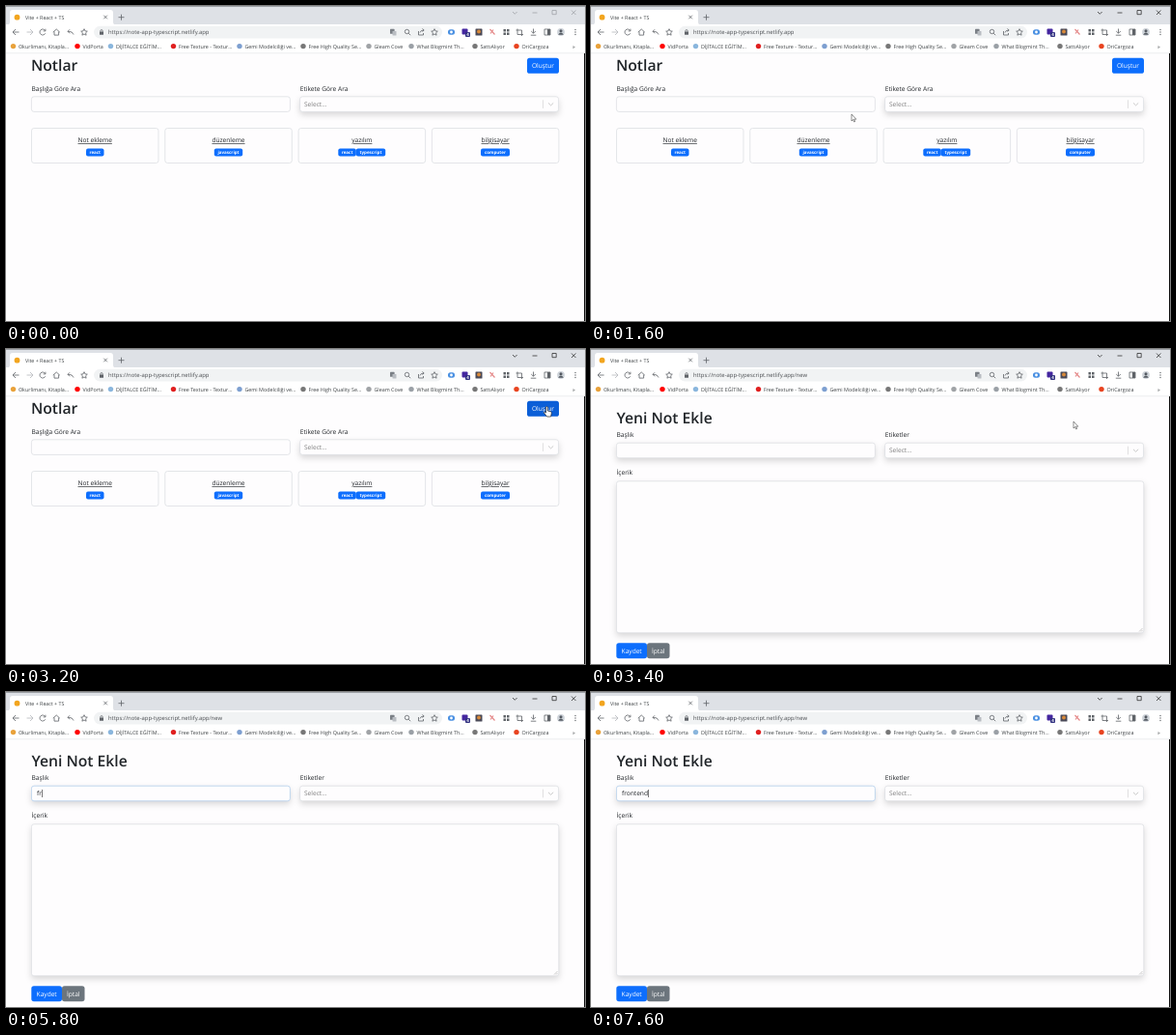
Recreate the animation shown at these times as an HTML page. Size 600 by 326 pixels, loop 8000 ms.

```html
<!DOCTYPE html>
<html lang="tr">
<head>
<meta charset="utf-8">
<title>Notlar</title>
<style>
  html, body { margin: 0; width: 100%; height: 100%; overflow: hidden; background: #fefdfe; }
  svg { display: block; width: 600px; height: 326px; }
  text { font: 6.6px "Open Sans", "Noto Sans", sans-serif; fill: #212529; text-rendering: geometricPrecision; white-space: pre; }
  .mid { text-anchor: middle; }
  .h1 { font-size: 15.7px; font-weight: 600; }
  .tab { font-size: 5.3px; fill: #3c4043; }
  .url { font-size: 5.9px; fill: #4a4d51; }
  .mark { font-size: 5.4px; fill: #3c4043; }
  .hint { fill: #808080; }
  .white { fill: #fff; }
  .link { text-decoration: underline; }
  .badge { font-size: 4.5px; font-weight: 700; fill: #fff; }
  .box { fill: #fefdfe; stroke: #d8dbe0; stroke-width: .7; }
  .raised { filter: drop-shadow(0 3px 3px rgba(0,0,0,.15)); }
  .line { fill: none; stroke: #5f6368; stroke-width: .8; }
</style>
</head>
<body>
<svg id="stage" viewBox="0 0 600 326"></svg>
<script>
const rect = (x, y, w, h, fill, r = 0, more = '') =>
  `<rect x="${x}" y="${y}" width="${w}" height="${h}" rx="${r}" fill="${fill}" ${more}/>`;
const box = (x, y, w, h, cls = '', id = '') =>
  `<rect class="box ${cls}" id="${id}" x="${x}" y="${y}" width="${w}" height="${h}" rx="2.6"/>`;
const text = (x, y, s, cls = '', id = '') => `<text x="${x}" y="${y}" class="${cls}" id="${id}">${s}</text>`;
const dot = (x, y, r, fill) => `<circle cx="${x}" cy="${y}" r="${r}" fill="${fill}"/>`;
const line = (d, more = '') => `<path class="line" d="${d}" ${more}/>`;
const button = (x, y, w, fill, label, id = '') =>
  rect(x, y, w, 16, fill, 2.6, `id="${id}"`) + text(x + w / 2, y + 10.4, label, 'mid white');
const select = y => box(304.6, y, 268, 15.6, 'raised') + text(309, y + 10.2, 'Select...', 'hint') +
  line(`M556.5 ${y + 3.5}v8.6`, 'style="stroke:#ccc;stroke-width:.6"') +
  line(`M562 ${y + 6.6}l2.6 2.5 2.6-2.5`, 'style="stroke:#bbb"');

// Browser window
const marks = [
  [7.5, '#e9a23b', 'Okurlimanı, Kitapla...'], [74, '#f00', 'VidPorta'],
  [108.5, '#8ab6dd', 'DİJİTALCE EĞİTİM...'], [173.5, '#e02020', 'Free Texture - Textur...'],
  [242, '#7d9fd0', 'Gemi Modelciliği ve...'], [308, '#777', 'Free High Quality Se...'],
  [376, '#a0a3a6', 'Gleam Cove'], [420, '#9aa0a6', 'What Blogmint Th...'],
  [486, '#777', 'SattıAlıyor'], [529, '#e8431f', 'OriCargoza']
];
const chrome =
  rect(0, 0, 600, 19.5, '#dee1e6') + rect(0, 0, 600, .8, '#8e9196') +
  '<path d="M1 19.5q3 0 3-3V7q0-3 3-3h101q3 0 3 3v9.5q0 3 3 3z" fill="#fff"/>' +
  rect(0, 19, 600, 30, '#fff') + dot(11.5, 11.7, 2.9, '#f2a51f') +
  text(20, 13.8, 'Vite + React + TS', 'tab') +
  line('M101.3 9.7l3.6 3.6m0-3.6l-3.6 3.6M116.5 11.7h6m-3-3v6') +
  '<g id="controls">' +
  line('M525 6l2.3 2.3L529.6 6M545.5 7h5M566 4.5h4.2v4.2H566zM586 4.5l4.5 4.5m0-4.5L586 9', 'style="stroke:inherit"') + '</g>' +
  line('M13.5 27H7m3-3l-3 3 3 3M40.6 25.5a3 3 0 1 0 .1 2.8m.2-4.6v2.2h-2.3M48.8 27.2l3.5-3.2 3.5 3.2M50 26.6v3.5h4.6v-3.5M70 29.5q-1-3.5-6-3.2m2-2l-2 2 2 2') +
  line('M21.5 27H28m-3-3l3 3-3 3', 'style="stroke:#b5b8bc"') +
  rect(91, 20.8, 361, 12.6, '#f1f3f4', 6.3) +
  rect(97, 26.6, 4, 3.2, '#5f6368', .5) + line('M97.8 26.8v-1a1.2 1.2 0 0 1 2.4 0v1', 'style="stroke-width:.7"') +
  '<text x="106" y="29.2" class="url">https://note-app-typescript.netlify.app<tspan id="path"></tspan></text>' +
  rect(398, 23.8, 4.6, 5, '#7b8086', .6) + rect(400.5, 26, 4, 4.5, '#b9bdc2', .6) +
  line('M417.2 28.2l2 2M427.5 26v4h5v-2M429 27.5q.5-2.5 4-2.5m-1.5-1.5l1.7 1.5-1.7 1.5') +
  '<circle class="line" cx="415.5" cy="26.5" r="2.2"/>' +
  [81, 444].map(x => line(`M${x} 23.7l1 2.2 2.3.3-1.7 1.6.5 2.4-2.1-1.2-2.1 1.2.5-2.4-1.7-1.6 2.3-.3z`)).join('') +
  rect(458, 24.2, 7, 5.6, '#4a90e2', 2.5) + dot(461.5, 27, 1.4, '#fff') +
  rect(472.5, 23.5, 6, 6, '#4527a0', 1) + rect(476, 27, 5, 5, '#303080', 1) + text(478.5, 31, '4', 'badge mid') +
  rect(486.5, 23.5, 7, 7, '#4a4a58', .6) + dot(490, 26.5, 2, '#d98a3a') +
  line('M501.5 24l5 5.5m-1.5-5l-3 4', 'style="stroke:#e58a8a;stroke-width:1.2"') +
  [[515.5, 24], [519, 24], [515.5, 27.5], [519, 27.5]].map(p => rect(...p, 2.5, 2.5, '#5f6368')).join('') +
  line('M530 23.5v6h6M528.5 25h6v6M546.5 23.5v4.5m-2.3-2l2.3 2.3 2.3-2.3M543.8 30.2h5.5M558 24h6v6h-6z') +
  rect(561, 24, 3, 6, '#5f6368') + dot(575, 27, 3.9, '#cfd4da') + dot(575, 25.7, 1.5, '#555b63') +
  '<path d="M572.2 29.7q2.8-4.5 5.6 0z" fill="#555b63"/>' +
  [24.5, 27, 29.5].map(y => dot(590, y, .7, '#5f6368')).join('') +
  marks.map(([x, c, s]) => dot(x, 41.6, 2.7, c) + text(x + 5.4, 43.5, s, 'mark')).join('') +
  text(587, 43.5, '»', 'mark') + rect(0, 48.5, 600, .7, '#e3e5e8');

// Note list
const badge = (x, w, s) => rect(x, 147.5, w, 8, '#0d6efd', 2) + text(x + w / 2, 153.1, s, 'badge mid');
const cards = ['Not ekleme', 'düzenleme', 'yazılım', 'bilgisayar'];
const list = text(26, 67, 'Notlar', 'h1') + button(540, 53.8, 33, '#0d6efd', 'Oluştur', 'create') +
  text(26.5, 87.5, 'Başlığa Göre Ara') + text(304.8, 87.5, 'Etikete Göre Ara') +
  box(26.4, 93.8, 268, 15.6) + select(93.8) +
  cards.map((s, i) => box(26.5 + 138.3 * i, 126.5, 131.5, 36) + text(92.2 + 138.3 * i, 141, s, 'mid link')).join('') +
  badge(83, 18.5, 'react') + badge(215.8, 29.4, 'javascript') + badge(344.3, 18.5, 'react') +
  badge(362.8, 30.4, 'typescript') + badge(492, 30, 'computer');

// New note form
const form = text(26.5, 77, 'Yeni Not Ekle', 'h1') + text(26.5, 91, 'Başlık') + text(304.8, 91, 'Etiketler') +
  box(26.4, 97.2, 268, 15.6, 'raised', 'field') + select(97.2) +
  text(32, 107.4, '', '', 'typed') + rect(32, 101, .6, 8, '#222', 0, 'id="caret"') +
  text(26.5, 130.2, 'İçerik') + box(26.4, 136.8, 546.4, 157, 'raised') +
  line('M568 292.5l3.5-3.5m-1.5 3.5l1.5-1.5', 'style="stroke:#999;stroke-width:.5"') +
  button(26.3, 304.2, 31.7, '#0d6efd', 'Kaydet') + button(58, 304.2, 23.5, '#6c757d', 'İptal');

const pointers =
  '<path id="arrow" d="M0 0v7l1.600-1.400 1.100 2.400 1-.500-1.100-2.300h2.200z" fill="#fff" stroke="#444" stroke-width=".6"/>' +
  '<path id="hand" d="M-1 0q1-1 1.800 0v4l3 .6q1.200.4 1 1.800l-.7 3.600H0l-3-4q0-1.200 1-.8l1 .8z" fill="#fff" stroke="#222" stroke-width=".7"/>' +
  '<path id="beam" d="M-1.800-6.500h3.600M0-6.500v13M-1.800 6.500h3.600" fill="none" stroke="#444" stroke-width=".7"/>';

stage.innerHTML = `<g id="list">${list}</g><g id="form">${form}</g>${chrome}` +
  rect(599, 49, 1, 277, '#111') + pointers;

const $ = id => document.getElementById(id);
const show = (id, on) => $(id).style.display = on ? '' : 'none';

// Pointer position every 200 ms, starting at 1000 ms
const track = [
  [300, 226], [296, 190], [285, 150], [270, 112], [254, 76], [375, 66], [471.5, 58.5], [510, 54],
  [538, 58], [555, 61], [560.5, 60], [560.5, 60], [500, 75], [400, 92], [270, 104], [195, 107]
];
const typing = [[0, ''], [5000, 'f'], [5800, 'fr'], [7000, 'fron'], [7200, 'fronte'], [7600, 'frontend']];

function draw(now) {
  const t = Math.floor(now % 8000 / 200) * 200;
  const editing = t >= 3400, focused = t >= 4400;
  show('list', !editing);
  show('form', editing);
  $('path').textContent = editing ? '/new' : '';
  $('controls').style.stroke = t < 800 ? '#a0a3a8' : '#333';

  const [x, y] = track[Math.max(0, Math.min(track.length - 1, (t - 1000) / 200))];
  const visible = t >= 1000 && t < 5000;
  const hover = !editing && x > 539 && y < 70;
  const kind = hover ? 'hand' : editing && x < 294 ? 'beam' : 'arrow';
  for (const id of ['arrow', 'hand', 'beam']) {
    show(id, visible && id === kind);
    $(id).setAttribute('transform', `translate(${x} ${y})`);
  }
  $('create').setAttribute('fill', hover ? '#0b5ed7' : '#0d6efd');

  $('field').style.stroke = focused ? '#a9c9ea' : '';
  $('typed').textContent = typing.filter(k => k[0] <= t).pop()[1];
  show('caret', focused);
  if (editing) $('caret').setAttribute('x', 32.2 + $('typed').getComputedTextLength());
}

const start = performance.now();
function tick() {
  draw(performance.now() - start);
  requestAnimationFrame(tick);
}
tick();
</script>
</body>
</html>
```
